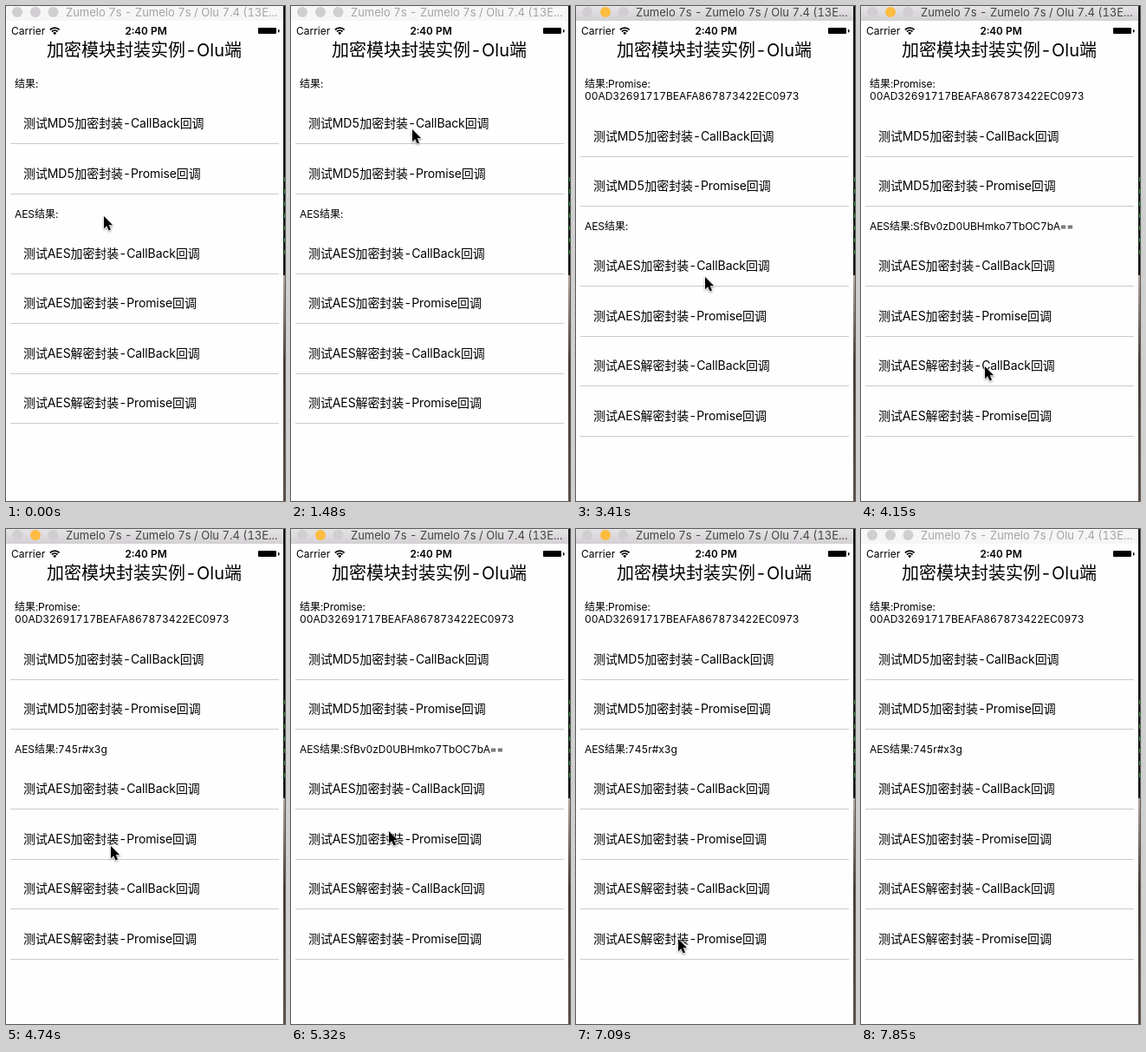
Write an HTML page that moves like this. It is 322 px wide and 570 px high and loops after 7950 ms.

```html
<!DOCTYPE html>
<html lang="zh-CN">
<head>
<meta charset="utf-8">
<style>
html, body { margin: 0; width: 322px; height: 570px; overflow: hidden; background: #fff; }
svg { display: block; font: 12px Inter, "Noto Sans CJK SC", "Noto Sans CJK", sans-serif; font-variant-numeric: tabular-nums; }
.result { letter-spacing: -.06px; }
.row { font-size: 14px; letter-spacing: -.1px; }
</style>
</head>
<body>
<svg width="322" height="570" viewBox="0 0 322 570">
  <defs>
    <linearGradient id="active" x2="0" y2="1">
      <stop stop-color="#e5e3e5"/><stop offset="1" stop-color="#d3d0d3"/>
    </linearGradient>
    <linearGradient id="edge" x2="0" y2="1">
      <stop stop-color="#b5a39b"/><stop offset=".4" stop-color="#43352f"/><stop offset="1" stop-color="#5c4b44"/>
    </linearGradient>
  </defs>
  <rect width="322" height="570" fill="#fefefe"/>

  <rect id="bar" width="320" height="17"/>
  <g fill="#d0ced0"><circle cx="13" cy="7" r="6"/><circle id="amber" cx="34" cy="7" r="6"/><circle cx="54.5" cy="7" r="6"/></g>
  <text id="caption" x="69" y="12" font-size="13">Zumelo 7s - Zumelo 7s / Olu 7.4 (13E...</text>

  <text x="6" y="32.5">Carrier</text>
  <path d="M50.8 27.3a7.6 7.6 0 0 1 10.8 0M52.9 29.5a4.7 4.7 0 0 1 6.6 0" fill="none" stroke="#000" stroke-width="1.8"/>
  <path d="M56.2 33.2l-2-2.2a3 3 0 0 1 4 0z"/>
  <text x="161.5" y="32.5" text-anchor="middle" font-weight="600">2:40 PM</text>
  <rect x="291" y="25" width="21" height="7" rx="1"/>
  <rect x="314" y="27" width="1.5" height="3.5" rx=".7"/>

  <text x="159.5" y="57.5" text-anchor="middle" font-size="20">加密模块封装实例-Olu端</text>
  <g class="result">
    <text id="md5" x="10" y="94"></text>
    <text id="hash" x="10" y="108">00AD32691717BEAFA867873422EC0973</text>
    <text id="aes" x="10"></text>
  </g>
  <g id="rows"></g>

  <rect x="320" width="2" height="310" fill="#0d100e"/>
  <rect x="320" y="310" width="2" height="260" fill="url(#edge)"/>
  <path d="M321.5 197v93" stroke="#2f9a3c" stroke-dasharray="5 9"/>

  <path id="cursor" d="M0 0V14.2L3.2 11.2L5.6 16.6L8 15.5L5.7 10.3H10.2Z" stroke="#fff" stroke-width="1.2" paint-order="stroke" style="filter:drop-shadow(0 1px 1px #0006)"/>
</svg>
<script>
const LOOP = 7950, STEP = 147.7, HOLD = 2;
const $ = id => document.getElementById(id);

const labels = ['MD5加密', 'AES加密', 'AES解密']
  .flatMap(s => ['CallBack', 'Promise'].map(way => `测试${s}封装-${way}回调`));
const outputs = ['Callback:', 'Promise:', 'SfBv0zD0UBHmko7TbOC7bA==', 'SfBv0zD0UBHmko7TbOC7bA==', '745r#x3g', '745r#x3g'];

// Cursor stops: step, x, y and the row pressed there, if any
const stops = [
  [-2, 113, 242], [3, 74, 206], [6, 175, 159],
  [12, 140, 142, 0], [18, 158, 202, 1], [25, 149, 312, 2], [29, 143, 415, 4],
  [34, 113, 348, 3], [41, 113, 300, 2], [45, 116, 420, 4], [49, 118, 472, 5],
  [53, 150, 580]
];

$('rows').innerHTML = labels.map(s => `<g class="row">
  <rect x="5" y="-47" width="310" height="47" fill="#a5a5a5"/>
  <text x="20" y="-18">${s}</text>
  <rect x="5" width="310" height="1" fill="#cbcbcb"/></g>`).join('');
const rows = [...$('rows').children];

// Rest after each stop, then ease to the next one and arrive early
function cursorAt(k) {
  const i = stops.findIndex(s => s[0] > k);
  if (i < 0) return stops.at(-1).slice(1);
  const [a, ...from] = stops[i - 1], [b, ...to] = stops[i];
  const u = Math.min(1, Math.max(0, 2 * (k - a - HOLD) / (b - a - HOLD)));
  const ease = u * u * (3 - 2 * u);
  return [0, 1].map(j => Math.round(from[j] + (to[j] - from[j]) * ease));
}

// Output of the last finished press among rows lo to hi
function result(k, lo, hi) {
  const press = stops.findLast(([step, , , row]) => step < k && row >= lo && row <= hi);
  return press ? outputs[press[3]] : '';
}

function draw(now) {
  const k = Math.floor(now % LOOP / STEP);
  const active = k >= 11 && k < 51;
  const md5 = result(k, 0, 1);
  const shift = md5 ? 14.5 : 0;

  $('bar').setAttribute('fill', active ? 'url(#active)' : '#f6f6f6');
  $('caption').setAttribute('fill', active ? '#444' : '#a5a5a5');
  $('amber').setAttribute('fill', active ? '#fdbc40' : '#d0ced0');

  $('md5').textContent = '结果:' + md5;
  $('hash').setAttribute('visibility', md5 ? 'visible' : 'hidden');
  $('aes').textContent = 'AES结果:' + result(k, 2, 5);
  $('aes').setAttribute('y', 243.5 + shift);

  rows.forEach((row, i) => {
    const y = Math.round(158.25 + 57.5 * i + (i > 1 ? 34.5 : 0) + shift);
    const down = stops.some(s => s[3] === i && k >= s[0] && k < s[0] + HOLD);
    row.setAttribute('transform', `translate(0 ${y})`);
    row.children[0].setAttribute('opacity', down ? 1 : 0);
    row.children[1].setAttribute('opacity', down ? .85 : 1);
  });

  $('cursor').setAttribute('transform', `translate(${cursorAt(k)})`);
  requestAnimationFrame(draw);
}
requestAnimationFrame(draw);
</script>
</body>
</html>
```
